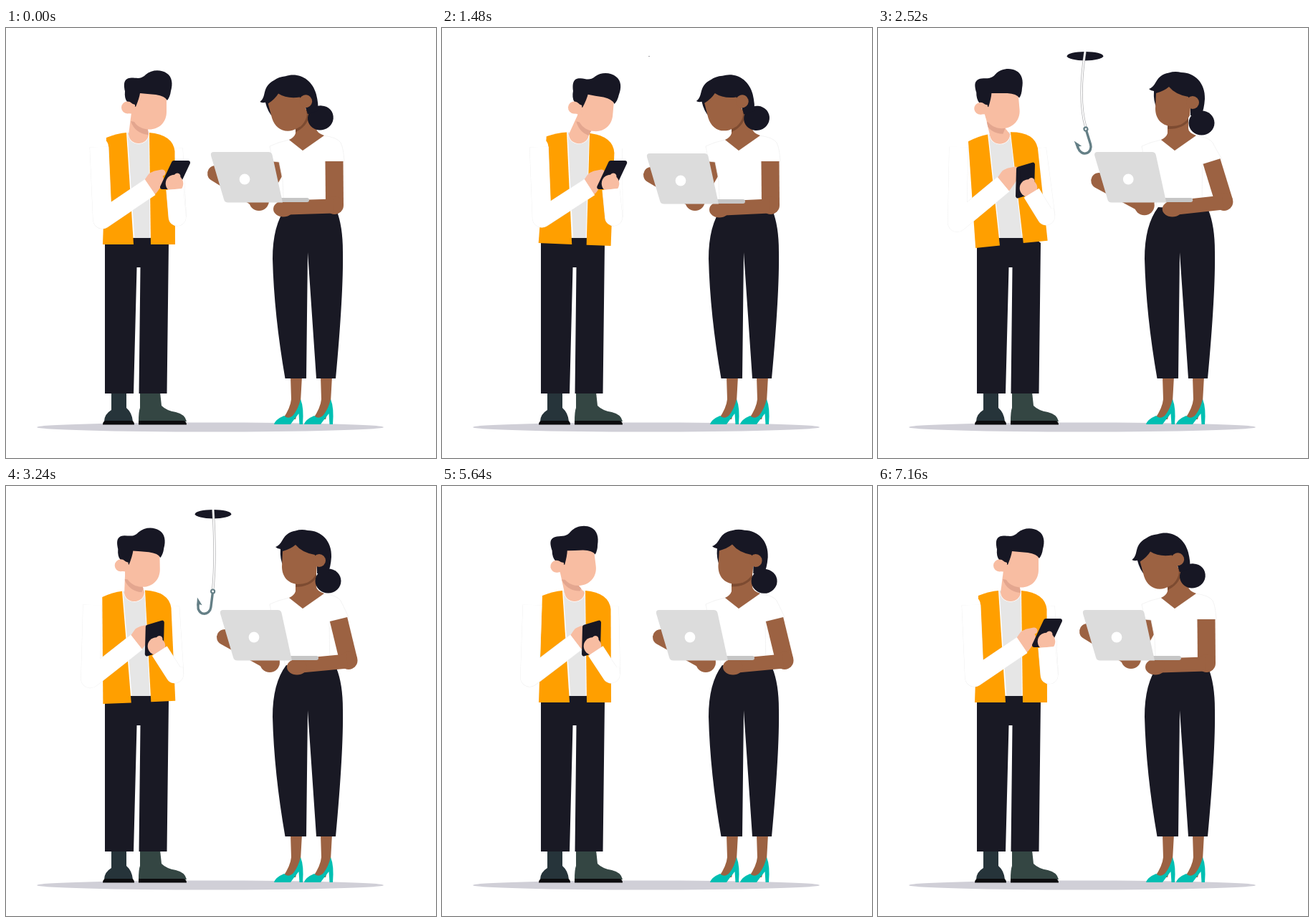
Animation of 600x600 px, one loop 7.2 s. Source, as an HTML page with a canvas:

```html
<!DOCTYPE html>
<html lang="en">
<head>
<meta charset="utf-8">
<title>Two colleagues and a hook</title>
<style>
html, body { margin: 0; width: 100%; height: 100%; overflow: hidden; background: #fff; }
canvas { display: block; width: 600px; height: 600px; }
</style>
</head>
<body>
<canvas id="stage" width="600" height="600"></canvas>
<script>
const c = document.getElementById('stage').getContext('2d');
const LOOP = 7200;
const INK = '#171724', CLOTH = '#191924', SKIN = '#f8bda2', SKIN_SHADE = '#e3a68f';
const BROWN = '#9c6242', BROWN_SHADE = '#7d4b31', VEST = '#ff9f00', TEAL = '#00bfb2';
const STEEL = '#647f86', EDGE = '#eeeeee';

// Drawing helpers
function fill(color, d, edge) {
  const p = new Path2D(d);
  c.fillStyle = color;
  c.fill(p);
  if (edge) { c.strokeStyle = edge; c.lineWidth = .7; c.stroke(p); }
}
function oval(color, x, y, rx, ry = rx) {
  c.fillStyle = color;
  c.beginPath();
  c.ellipse(x, y, rx, ry, 0, 0, 7);
  c.fill();
}
function line(color, width, d, cap = 'butt') {
  c.strokeStyle = color;
  c.lineWidth = width;
  c.lineCap = cap;
  c.lineJoin = 'round';
  c.stroke(new Path2D(d));
}
function sleeve(width, d) {
  line(EDGE, width + .8, d);
  line('#fff', width, d);
}
function within(setup, draw) {
  c.save();
  setup();
  draw();
  c.restore();
}
// Rotate about the point (px, py) after moving it to (x, y)
function turn(x, y, px, py, deg) {
  c.translate(x, y);
  c.rotate(deg * Math.PI / 180);
  c.translate(-px, -py);
}
function neck(skin, shade, d, shadow, pose) {
  fill(skin, d);
  within(() => { c.clip(new Path2D(d)); pose(); }, () => fill(shade, shadow));
}

// Eased value between [time, value] cues
const mix = (a, b, u) => a + (b - a) * u;
function track(t, cues) {
  let i = 0;
  while (i < cues.length - 2 && t >= cues[i + 1][0]) i++;
  const [t0, a] = cues[i], [t1, b] = cues[i + 1];
  const u = Math.min(1, Math.max(0, (t - t0) / (t1 - t0)));
  return mix(a, b, u * u * (3 - 2 * u));
}

// Man: shoulder sway in px, head angle, how far the phone is drawn in
const SWAY = [[0, 0], [1440, 6], [1640, 6], [2520, -15], [3240, -6], [4440, -8], [4560, -8], [5640, 0]];
const NOD = [[0, 0], [1440, 5], [1640, 5], [2520, -5], [3240, -1], [4440, 5], [4560, 5], [5640, -7], [7160, 0]];
const TUCK = [[1640, 0], [2520, 1], [5640, 1], [7160, 0]];
// Woman: body turn, head angle, small dip of the laptop
const SPIN = [[1600, 0], [2280, 1.45], [2520, 1.25], [3240, 1], [6080, 1], [7160, 0]];
const LOOK = [[0, -18], [1600, -17], [2280, 2], [2520, 0], [3240, 0], [4440, -8], [4600, -8], [5560, 1], [6080, 1], [7160, -18]];
const DIP = [[0, 0], [1440, 2], [1600, 2], [2280, 0]];
// Hook: hole size, height above rest, swing angle
const HOLE = [[1440, 0], [1760, 1], [4400, 1], [4760, 2.1], [5320, 2.1], [5600, 0]];
const LIFT = [[1740, 160], [2440, 6], [2560, 6], [3000, 0], [4440, 0], [5240, 160]];
const swingAt = t => t < 1740 || t > 4440 ? 0 :
  -27 * Math.exp(-Math.max(0, t - 2160) / 800) * Math.sin((t - 2160) / 720 * Math.PI) * Math.min(1, (t - 1740) / 400);

function manLegs() {
  fill('#26343a', 'M147 508H168V530Q176 537 177 549H137Q137 539 147 533Z');
  fill('#0c0c0e', 'M135 553.500Q135 548 140 548H176Q179 549 179 553.500Z');
  fill('#344643', 'M187 508H215L217 527Q224 534 237 536Q250 539 252 549H185Q185 535 187 530Z');
  fill('#0c0c0e', 'M185 553.500V548H248Q252 549 252 553.500Z');
}

function manHead() {
  fill(SKIN, 'M177 88H224V117C224 132 213 141.500 200 141.500C186 141.500 175 132 175 117Z');
  fill(INK, 'M181 110L169 103Q165 98 166 88C164 78 164 70 175 69.500C183 69.500 188 72 195 65' +
    'C203 58 216 57.500 224 63C232 68 233 78 230 88Q229 96 225 101Q222 95 209 93Q197 92 187 91Q186 98 181 110Z');
  oval(SKIN, 169.5, 111, 8.5);
  fill(SKIN, 'M169 103L180 107V120L169 119Z');
}

function man(t) {
  const sway = track(t, SWAY), nod = track(t, NOD), tuck = track(t, TUCK);
  const lean = sway * .39, slide = .6 * sway;
  const nx = 1.6 * nod, ny = .3 * nod;
  const torso = () => turn(184, 293, 184, 293, lean);
  const head = () => turn(198 + nx, 100 + ny, 198, 100, nod - lean);

  manLegs();
  const rsx = 234 + .8 * sway, rex = 239 - 3 * tuck + .1 * sway, rey = 264 - tuck;
  sleeve(25, `M${rsx} 168L${rex} ${rey}`);
  within(torso, () => {
    fill('#e6e6e6', `M168 146L${178 + slide} 300H202L200 146Z`);
    line('#fff', 1.6, `M168.500 146L${178.5 + slide} 292M200 146L201.500 292`);
  });
  fill(CLOTH, 'M138 300L150 293H218L227 300L224.500 510H185.500L187.500 334H182.500L178 510H138Z');
  within(torso, () => {
    fill(VEST, `M140 153Q155 147 168 146L${178 + slide} 302H135Z`);
    fill(VEST, 'M200 146Q233 149 235.500 172L236 302H202Z');
    const d = `M${175 + nx} ${118 + ny}L171 149C173 165 197 165 199 149L${197 + nx} ${135 + ny}Z`;
    line('#fff', 1.4, 'M171 149C173 165 197 165 199 149');
    neck(SKIN, SKIN_SHADE, d, 'M174 130Q180 147 198 149L205 135Z', head);
    within(head, manHead);
  });

  // Both hands and the phone
  const sx = 130 - 4 * tuck + .9 * sway, ex = 134.5 - 12 * tuck + .8 * sway, ey = 267 - .3 * sway;
  const wx = 201 - 14 * tuck + .8 * sway, wy = 222 - 4 * tuck;
  line(SKIN, 24, `M${wx} ${wy}l7 -10`, 'round');
  line(SKIN, 9, `M${wx + 7} ${wy - 18}l10 -2`, 'round');
  const px = 236 - 27.5 * tuck + .2 * sway, py = 205 + 7.5 * tuck;
  const rise = -3 * tuck, slant = 8 - 7.5 * tuck, half = 17 + 2 * tuck;
  const phone = `M${px - 10 + slant} ${py - rise - half}L${px + 10 + slant} ${py + rise - half}` +
    `L${px + 10 - slant} ${py + rise + half}L${px - 10 - slant} ${py - rise + half}Z`;
  fill(INK, phone);
  line(INK, 6, phone);
  const hx = 235 - 25 * tuck, hy = 217 + 6.5 * tuck;
  oval(SKIN, hx, hy, 12.3);
  line(SKIN, 9, `M${hx} ${hy - 3}l4 -7`, 'round');

  const cuff = 8 / Math.hypot(rex - hx, rey - hy);
  sleeve(24, `M${mix(hx, rex, cuff)} ${mix(hy, rey, cuff)}L${rex} ${rey}L${mix(rex, rsx, .1)} ${rey - 10}`);
  oval('#fff', sx, 166, 13);
  sleeve(26, `M${sx} 166L${ex} ${ey}L${wx} ${wy}`);
}

function heel(dx) {
  within(() => c.translate(dx, 0), () => {
    fill(BROWN, 'M397 486H413L411 522L404 546H386Q397 530 398 518Z');
    fill(TEAL, 'M374 553Q376 546 388 541Q394 547 401 540Q408 531 411 518Q416 530 414 553H409.500L408.500 538Q402 546 397 553Z');
  });
}

function womanHead(x, y, angle) {
  const pose = () => turn(x, y, 437, 104, angle);
  neck(BROWN, BROWN_SHADE, 'M404 115V147Q402 153 395 156L414 171L444 150Q433 146 433 140V112Z',
    'M400 135H420L434 118V127Q424 142 400 141Z', pose);
  within(pose, () => {
    oval(INK, 449.5, 132.5, 18, 17);
    fill(INK, 'M376 85C388 81 384 66 404 62.500Q412 60 421 62C440 62 455 77 454 99Q453 114 449 122L434 122' +
      'L434 110L387 112Q382 102 383 88Q379 88 376 85Z');
    fill(BROWN, 'M386 91Q397 88 404 82Q413 93 431 96L434 110L433 122C428 133 418 137 407 137C393 136 385 126 385 112Z');
    oval(BROWN, 437, 104, 9);
  });
}

function laptop(x, y) {
  within(() => c.translate(x, y), () => {
    fill('#c6c6c6', 'M384 237H420Q423 237 423 240Q423 243 420 243H384Z');
    fill('#dcdcdc', 'M290 173H366Q370.500 173 371.500 177L386 243.500H310Q305 243.500 304 239L286 178Q285 173 290 173Z');
    oval('#fff', 333, 211, 7.4);
  });
}

function woman(t) {
  const spin = track(t, SPIN), look = track(t, LOOK), dip = track(t, DIP);
  heel(0);
  heel(42);

  const ex = 353 + 15 * spin, ey = 241 + 5 * spin;
  line(BROWN, 22, `M${382 + 13 * spin} 190L${ex} ${ey}L${292 + 13 * spin} ${203 + dip + 8 * spin}`, 'round');
  oval(BROWN, ex, ey, 14);

  const sx = 458 + 6 * spin, rex = 458.5 + 19.5 * spin, rey = 247.5 - 4 * spin, tilt = 3 * spin;
  fill('#fff', `M395 156L414 171L443 150Q463 153 467 160Q471 168 ${sx + 14} ${186 - tilt}L${sx - 13} ${186 + tilt}` +
    'L452 258L390 253L387 236L386 212L381 187L372 186L368 165Q380 159 395 156Z', EDGE);
  fill(CLOTH, 'M391 250L461 254Q470 276 470 312Q471 370 460 489H433L421 313L419 489H389.500' +
    'Q374 400 372 322Q372 275 391 250Z');
  womanHead(429 + .6 * look + 8 * spin, 104 + .1 * look, look);

  const hx = 387 + 19 * spin, hy = 252.5 + dip / 2;
  line(BROWN, 25, `M${sx} 186L${rex} ${rey}`);
  oval(BROWN, rex, rey, 12.5);
  line(BROWN, 20, `M${rex - 2} ${rey + 1}L${hx + 6} ${hy - 2}`);
  oval(BROWN, hx, hy, 14, 11);
  laptop(13 * spin, dip);
}

function hook(t) {
  const open = track(t, HOLE);
  if (open <= 0) return;
  oval(INK, 289, 39.2, 25.3 * open, 6.2 * open);
  const y = 147 - track(t, LIFT), swing = swingAt(t), x = 289 - swing / 18;
  within(() => { c.beginPath(); c.rect(0, 33, 600, 300); c.clip(); }, () => {
    const rope = `M289 ${Math.min(33, y)}Q${289 + swing * .6} ${mix(33, y, .62)} ${x} ${y - 2}`;
    line('#b4b4b6', 3.4, rope);
    line('#fff', 1.8, rope);
    turn(x, y, 289, 147, swing);
    line(STEEL, 2.2, 'M291.500 147A2.500 2.500 0 1 1 286.500 147A2.500 2.500 0 1 1 291.500 147');
    line(STEEL, 3.4, 'M289 150V169.500A9 10 0 0 1 271 169.500V163');
    fill(STEEL, 'M268.500 158L276.500 168L270.500 167L269.300 170Z');
  });
}

function frame(now) {
  const t = now % LOOP;
  c.fillStyle = '#fff';
  c.fillRect(0, 0, 600, 600);
  oval('#d0cfd7', 285, 557, 242, 6.5);
  man(t);
  woman(t);
  hook(t);
  requestAnimationFrame(() => frame(performance.now() - start));
}
const start = performance.now();
frame(0);
</script>
</body>
</html>
```
